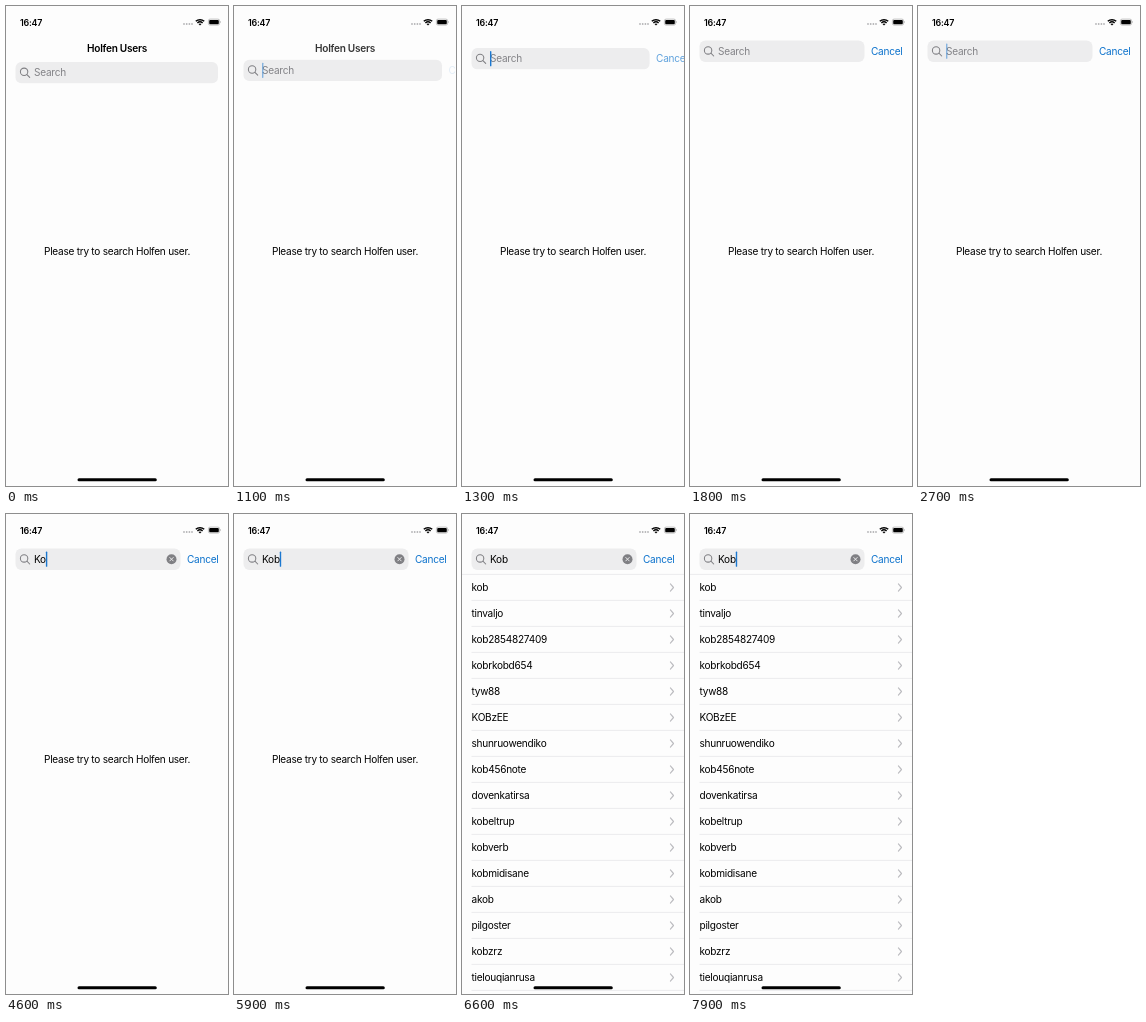
These frames come from a looping animation (222 by 480 pixels, 8000 ms). An HTML page:

```html
<!DOCTYPE html>
<html lang="en">
<head>
<meta charset="utf-8">
<title>User search</title>
<style>
html, body { margin: 0; width: 100%; height: 100%; overflow: hidden; background: #fdfdfd; }
svg { display: block; width: 222px; height: 480px; }
text { font: 10.06px Inter, Roboto, sans-serif; letter-spacing: -.25px; white-space: pre; }
.bold { font-weight: 600; }
.mid { text-anchor: middle; }
.line { fill: none; stroke-linecap: round; stroke-linejoin: round; }
</style>
</head>
<body>
<svg viewBox="0 0 222 480">
  <text x="14" y="19.6" class="bold" style="font-size:8.9px">16:47</text>
  <g fill="#b4b4b6">
    <circle cx="178" cy="18" r=".9"/><circle cx="180.7" cy="18" r=".9"/>
    <circle cx="183.4" cy="18" r=".9"/><circle cx="186" cy="18" r=".9"/>
  </g>
  <g class="line" stroke="#000" stroke-width="1.5" style="stroke-linecap:butt">
    <path d="M189.8 15.3a6.2 6.2 0 0 1 8.4 0M191.4 17a3.9 3.9 0 0 1 5.2 0"/>
  </g>
  <path d="M194 19.6l-1.5-1.5a2.2 2.2 0 0 1 3 0z"/>
  <rect x="202.4" y="13.1" width="11.2" height="6" rx="1.7" fill="none" stroke="#999" stroke-width=".6"/>
  <rect x="203.2" y="13.9" width="9.6" height="4.4" rx="1"/>
  <path d="M214.4 15.1a1.1 1.1 0 0 1 0 2z" fill="#999"/>

  <text id="title" x="111" y="46.4" class="bold mid">Holfen Users</text>
  <text id="hint" x="111" y="248.6" class="mid">Please try to search Holfen user.</text>
  <g id="list"></g>

  <g id="bar">
    <rect id="field" x="9.5" width="202.5" height="21.3" rx="5.9" fill="#ededee"/>
    <g class="line" stroke="#7f7f83" stroke-width="1.05">
      <circle cx="18.1" cy="9.8" r="3.7"/><path d="M20.9 12.6l2.8 2.8"/>
    </g>
    <text id="query" x="28" y="14.3"></text>
    <g id="clear">
      <circle cx="165.5" cy="10.6" r="5" fill="#7f7f83"/>
      <path d="M163.8 8.9l3.4 3.4m0-3.4l-3.4 3.4" class="line" stroke="#f4f4f5" stroke-width=".9"/>
    </g>
    <rect id="caret" y="3" width="1.4" height="15.2" rx=".6" fill="#1c78d0"/>
    <text id="cancel" y="14" fill="#0c72cc">Cancel</text>
  </g>
  <rect x="71.5" y="472.3" width="79.3" height="3" rx="1.5"/>
</svg>
<script>
const $ = id => document.getElementById(id);
const clamp = x => Math.max(0, Math.min(1, x));
const fade = (id, a) => $(id).setAttribute('opacity', a);
const LOOP = 8000;
const users = ['kob', 'tinvaljo', 'kob2854827409', 'kobrkobd654', 'tyw88', 'KOBzEE',
  'shunruowendiko', 'kob456note', 'dovenkatirsa', 'kobeltrup', 'kobverb', 'kobmidisane',
  'akob', 'pilgoster', 'kobzrz', 'tielouqianrusa'];
const keys = [4100, 4500, 4900];
// spans in which the caret is lit
const blinks = [[1100, 1700], [2100, 2700], [3100, 3700], [4100, 5500],
  [5800, 6500], [6800, 7500], [7800, 8100]];

$('list').innerHTML = '<path d="M0 60.4H222" stroke="#e0e0e2" stroke-width=".6"/>' +
  users.map((name, i) => `<g transform="translate(0 ${60.4 + 26 * i})">
    <text x="9.5" y="16.7">${name}</text>
    <path d="M208.4 9.5l3.1 3.6-3.1 3.6" class="line" stroke="#bcbcc0" stroke-width="1.15"/>
    <path d="M9.5 26H222" stroke="#e0e0e2" stroke-width=".6"/></g>`).join('');

function draw(t) {
  const p = clamp((t - 1000) / 500), e = p * p * (3 - 2 * p);
  const width = 202.5 - 37.5 * e;
  $('bar').setAttribute('transform', `translate(0 ${56 - 21.4 * e})`);
  $('field').setAttribute('width', width);
  $('cancel').setAttribute('x', width + 16);
  fade('cancel', e);
  fade('title', clamp(1 - 2 * e));

  const typed = 'Kob'.slice(0, keys.filter(k => t >= k).length);
  const query = $('query');
  query.textContent = typed || 'Search';
  query.setAttribute('fill', typed ? '#000' : '#838387');
  $('caret').setAttribute('x', 28 + (typed ? query.getComputedTextLength() : 0));
  fade('caret', Math.max(...blinks.map(([on, off]) =>
    clamp(Math.min(t - on + 100, off + 100 - t) / 200))));
  fade('clear', clamp((t - 4400) / 200) * (t >= 4500));

  const shown = clamp((t - 5950) / 400);
  fade('list', shown);
  fade('hint', clamp(1 - 2 * shown));
}

function tick() {
  draw(performance.now() % LOOP);
  requestAnimationFrame(tick);
}
tick();
</script>
</body>
</html>
```
